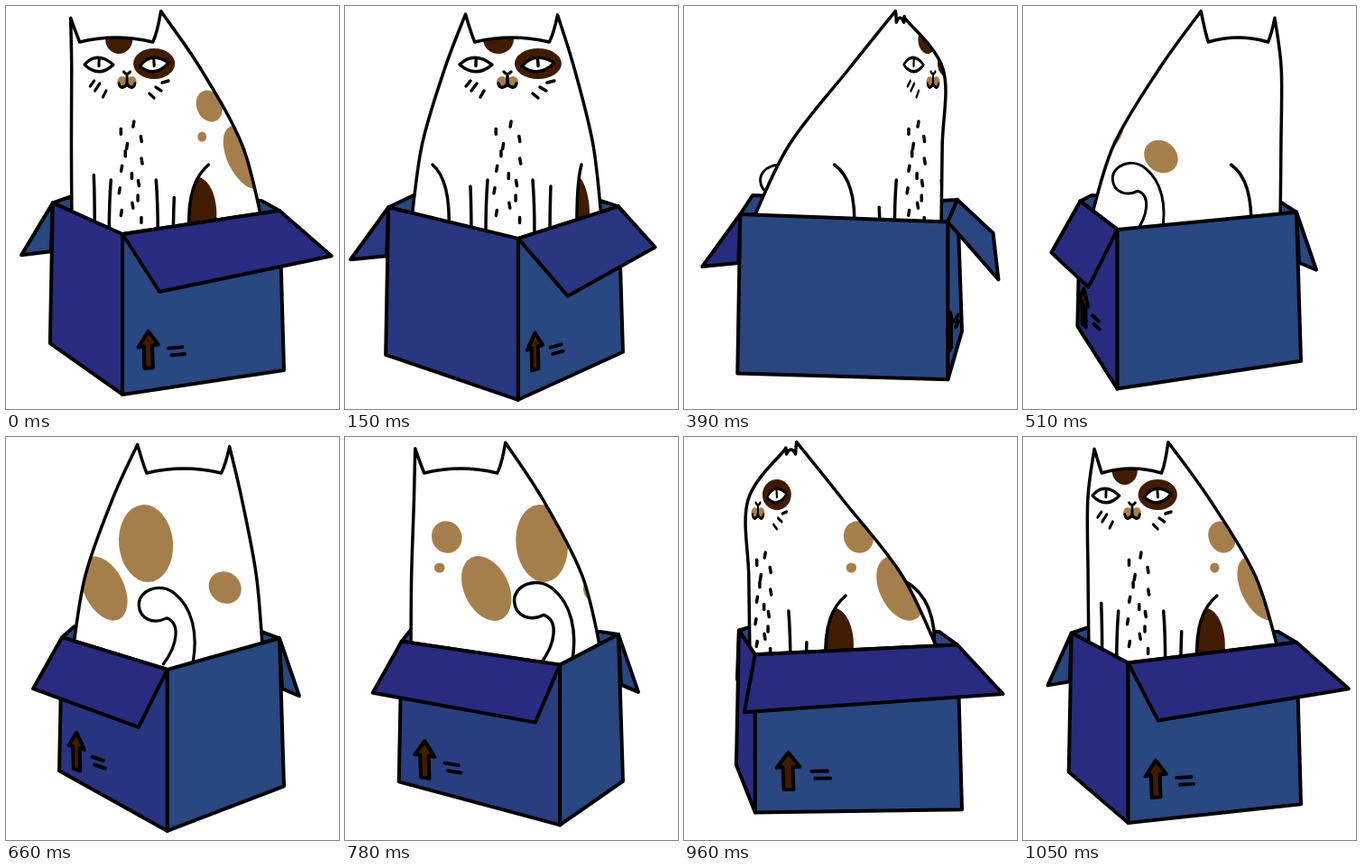
An HTML page with a canvas that plays this animation: 369x447 px, repeating every 1.08 s.

```html
<!DOCTYPE html>
<html lang="en">
<head>
<meta charset="utf-8">
<title>Cat in a turning box</title>
<style>
html, body { margin: 0; width: 100%; height: 100%; overflow: hidden; background: #fff; }
canvas { display: block; width: 369px; height: 447px; }
</style>
</head>
<body>
<canvas id="stage" width="369" height="447"></canvas>
<script>
const ctx = document.getElementById('stage').getContext('2d');
const LOOP = 1080, STEP = 30, MIRROR = 358;
const BROWN = '#421b03', TAN = '#a57f4b', BLUE = '#294780';
ctx.lineJoin = 'round';
ctx.lineCap = 'round';

const { sin, cos, tanh, abs, min, max, PI } = Math;
const clamp = v => max(0, min(1, v));
const mix = (a, b, k) => a + (b - a) * k;
const shift = ([x, y], dx, dy) => [x + dx, y + dy];

// Angle of something that faces the viewer at the given time
const turn = (t, facing) => (t - facing) / LOOP * 2 * PI;

// Blue between the shaded and the lit side
const shade = k => `rgb(41,${Math.round(mix(43, 71, clamp(k)))},128)`;

function ink(path, fill, width = 3.5) {
  if (fill) { ctx.fillStyle = fill; ctx.fill(path); }
  if (width) { ctx.strokeStyle = '#000'; ctx.lineWidth = width; ctx.stroke(path); }
}
const draw = (d, fill, width) => ink(new Path2D(d), fill, width);
const poly = (fill, ...pts) => draw('M' + pts.join('L') + 'Z', fill, 4);

function oval(x, y, rx, ry, fill, tilt = 0) {
  ctx.beginPath();
  ctx.ellipse(x, y, rx, ry, tilt, 0, 7);
  ctx.fillStyle = fill;
  ctx.fill();
}

function placed(x, y, sx, sy, paint) {
  ctx.save();
  ctx.translate(x, y);
  ctx.scale(sx, sy);
  paint();
  ctx.restore();
}

function spline(path, p) {
  for (let i = 0; i < p.length - 1; i++) {
    const a = p[i - 1] || p[i], b = p[i], c = p[i + 1], d = p[i + 2] || c;
    path.bezierCurveTo(b[0] + (c[0] - a[0]) / 6, b[1] + (c[1] - a[1]) / 6,
      c[0] - (d[0] - b[0]) / 6, c[1] - (d[1] - b[1]) / 6, c[0], c[1]);
  }
}

// Left side of the body for a head leaning left (-1) to right (1)
function flank(lean, ears) {
  const base = 73, cheek = 107 + 37 * lean + 45 * (1 - ears) * max(0, lean);
  return [[base, 245], [(base + cheek) / 2 - 6 * (1 + lean), 155], [cheek, 70]];
}

function bodyPath(t) {
  const lean = tanh(2.2 * sin(turn(t, 143)));
  const ears = max(.1, min(1, 1.45 * abs(cos(turn(t, 120))) - .13));
  const head = MIRROR / 2 + 62 * lean, half = 51 * ears;
  const tipL = [head - half, 9.5 - 4 * lean], tipR = [head + half, 9.5 + 4 * lean];
  const dip = min(40, 14 + half * .8);
  const left = [...flank(lean, ears), tipL];
  const right = [...flank(-lean, ears).map(([x, y]) => [MIRROR - x, y]), tipR].reverse();

  const path = new Path2D();
  path.moveTo(...left[0]);
  spline(path, left);
  path.quadraticCurveTo(head - half * .88, dip - 10, head - half * .8, dip);
  path.quadraticCurveTo(head, dip - 10, head + half * .82, dip);
  path.quadraticCurveTo(head + half * .92, dip - 10, ...tipR);
  spline(path, right);
  path.lineTo(185, 300);
  path.closePath();
  return path;
}

// A spot riding on the coat, seen while it faces the viewer
function spot(t, facing, centre, radius, y, rx, ry, tilt) {
  const a = turn(t, facing);
  if (cos(a) > 0) oval(centre + radius * sin(a), y, rx * (.75 + .25 * cos(a)), ry, TAN, tilt);
}

function spots(t) {
  spot(t, 855, 147, 81, 111, 17, 18, -.4);
  spot(t, 855, 139, 81, 145, 6, 5.5, 0);
  spot(t, 825, 179, 86, 168, 25, 38, -.45);
  spot(t, 678, 165, 95, 118, 30, 43, -.1);
  spot(t, 540, 172, 110, 167, 20, 17, .7);
}

function haunches(slide, d) {
  const r = 262 + .9 * slide, w = max(0, min(22, 5 - d * .11));
  draw(`M${r - w * .45},190C${r + 4},195 ${r + 13},220 ${r + 7},250H${r - w}C${r - w},222 ${r - w * .9},200 ${r - w * .45},190Z`, BROWN, 0);
  draw(`M${r},176C${r - w * .65},188 ${r - w * 1.1},208 ${r - w},250`);
  const l = 97 + .9 * slide, v = max(0, min(22, 18 + d * .11));
  draw(`M${l},176C${l + v * .65},186 ${l + v * 1.1},208 ${l + v},250`);
}

function legs(slide) {
  const leg = (x, top, bend) => draw(`M${x + slide},${top}q${bend},25 ${bend},60`);
  leg(139, 200 + .3 * slide, 1);
  leg(158, 193, -2);
  leg(208, 193, 2);
  leg(228, 200 - .3 * slide, -1);
}

function chest(slide, d) {
  const squeeze = cos(d / 280);
  for (let i = 0; i < 14; i++) {
    const x = 180 + slide + 14 * sin(.3 - 2.3 * i) * squeeze, lean = i % 3 - 1;
    draw(`M${x},${128 + 8.2 * i}l${lean},6`);
  }
}

function eye(x, tilt) {
  ctx.save();
  ctx.translate(x, 64.5);
  ctx.rotate(tilt);
  draw('M-18,1Q-3,-15 18,0Q0,16-18,1Z', '#fff', 3.5);
  draw('M0,-5V2');
  ctx.restore();
}

// Place of the nose as [time, x] key points
const NOSE = [[-210, 20], [-120, 82], [0, 134], [150, 180], [270, 236], [390, 276], [480, 340]];

function face(u) {
  const i = NOSE.findIndex(k => u <= k[0]);
  if (i < 1) return;
  const [a, b] = [NOSE[i - 1], NOSE[i]];
  const x = mix(a[1], b[1], (u - a[0]) / (b[0] - a[0]));
  placed(x, 0, max(.4, cos((u - 135) / 280)), 1, () => {
    oval(-10, 37, 17, 16, BROWN);
    oval(34, 64, 26, 17, BROWN);
    eye(34, -.08);
    eye(-35, .03);
    draw('M-41,83l-5,6M-34,86l-6,8M-26,94l-4,7');
    draw('M44,85l8,-2M36,90l7,4M28,97l6,5');
    oval(-6, 84, 6, 6, TAN);
    oval(6, 84, 6, 6, TAN);
    draw('M-4,73Q0,78 4,73M0,76V84M-10,86Q-9,91-5,90Q0,89 0,84Q0,89 5,90Q9,91 10,86');
  });
}

function tail(a) {
  const s = .93 + .1 * sin(a);
  placed(178 + 66 * sin(a), 252, s, s, () =>
    draw('M-4,0C14,-24 16,-49 0,-55C-16,-47-32,-54-33,-70C-34,-88-8,-99 10,-84C30,-68 38,-37 31,0', '#fff'));
}

function cat(t) {
  const u = t >= 780 ? t - LOOP : t;
  const d = u - 150, slide = .25 * d + 1.25e-6 * d ** 3;
  const body = bodyPath(t), a = turn(t, 660);
  const tailFront = cos(a) > .01;
  if (!tailFront) tail(a);
  ink(body, '#fff', 0);
  ctx.save();
  ctx.clip(body);
  spots(t);
  haunches(slide, d);
  legs(slide);
  chest(slide, d);
  face(u);
  ctx.restore();
  ink(body);
  if (tailFront) tail(a);
}

// Arrow and two dashes, sheared along the bottom edge from p to q
function label(p, q, lift) {
  const w = q[0] - p[0], slope = (q[1] - p[1]) / w, s = (w / 232) ** .6, k = .16;
  const at = new DOMMatrix([s, slope * s * .6, 0, 1, mix(p[0], q[0], k), mix(p[1], q[1], k) - lift]);
  const add = (d, fill) => {
    const path = new Path2D();
    path.addPath(new Path2D(d), at);
    ink(path, fill, 4);
  };
  add('M0,-21L-13,-4L-6,-5L-5,20H6L5,-5L13,-5Z', BROWN);
  add('M26,0h18M30,8h17');
}

// The box shows a new pair of sides twice a loop
const SIDES = [
  { start: -165, span: 585, bulge: 17, low: 360, sway: 27, lift: 45 },
  { start: 420, span: 495, bulge: 3, low: 346, sway: 8, lift: 32 }
];

function scene(t) {
  const arrowRight = t < 420 || t >= 915;
  const side = SIDES[arrowRight ? 0 : 1];
  const p = ((t - side.start) % LOOP) / side.span, q = sin(PI * p);

  const edge = 65 - side.bulge * q, corner = 60 + 245 * p;
  const lt = [edge, 213 + 19 * p], lb = [edge - 3, side.low + 50 * p];
  const ct = [corner, 236 + 22 * q], cb = [corner, 410 + 27 * q];
  const rt = [303, 232 - 18 * p], rb = [308, 387 + side.sway * cos(PI * p)];

  const back = arrowRight
    ? [lt, shift(lt, -42 * clamp(4 * p - .3), 58), shift(lt, -2, 54)]
    : [rt, shift(rt, 22, 64), shift(rt, 3, 56)];
  const flap = arrowRight
    ? [rt, shift(rt, 44 + 14 * sin(2 * PI * p), 56 - 20 * p), shift(ct, 56 - 110 * (1 - p) ** 6, 64), ct]
    : [lt, shift(lt, -32, 57), shift(ct, -32 + 60 * p ** 8, 64), ct];
  const tone = 1.4 * (p - .25);

  ctx.clearRect(0, 0, 369, 447);
  poly(arrowRight ? shade(1.6 - 2.1 * p) : BLUE, ...back);
  poly(BLUE, lt, [76, 210], [283, 216], rt, ct);
  cat(t);
  poly(shade(tone), lt, ct, cb, lb);
  poly(BLUE, ct, rt, rb, cb);
  if (arrowRight) label(cb, rb, side.lift);
  else label(lb, cb, side.lift);
  poly(arrowRight ? shade(tone) : shade(0), ...flap);
}

function tick(now) {
  scene(Math.floor(now / STEP) * STEP % LOOP);
  requestAnimationFrame(tick);
}
scene(0);
requestAnimationFrame(tick);
</script>
</body>
</html>
```
